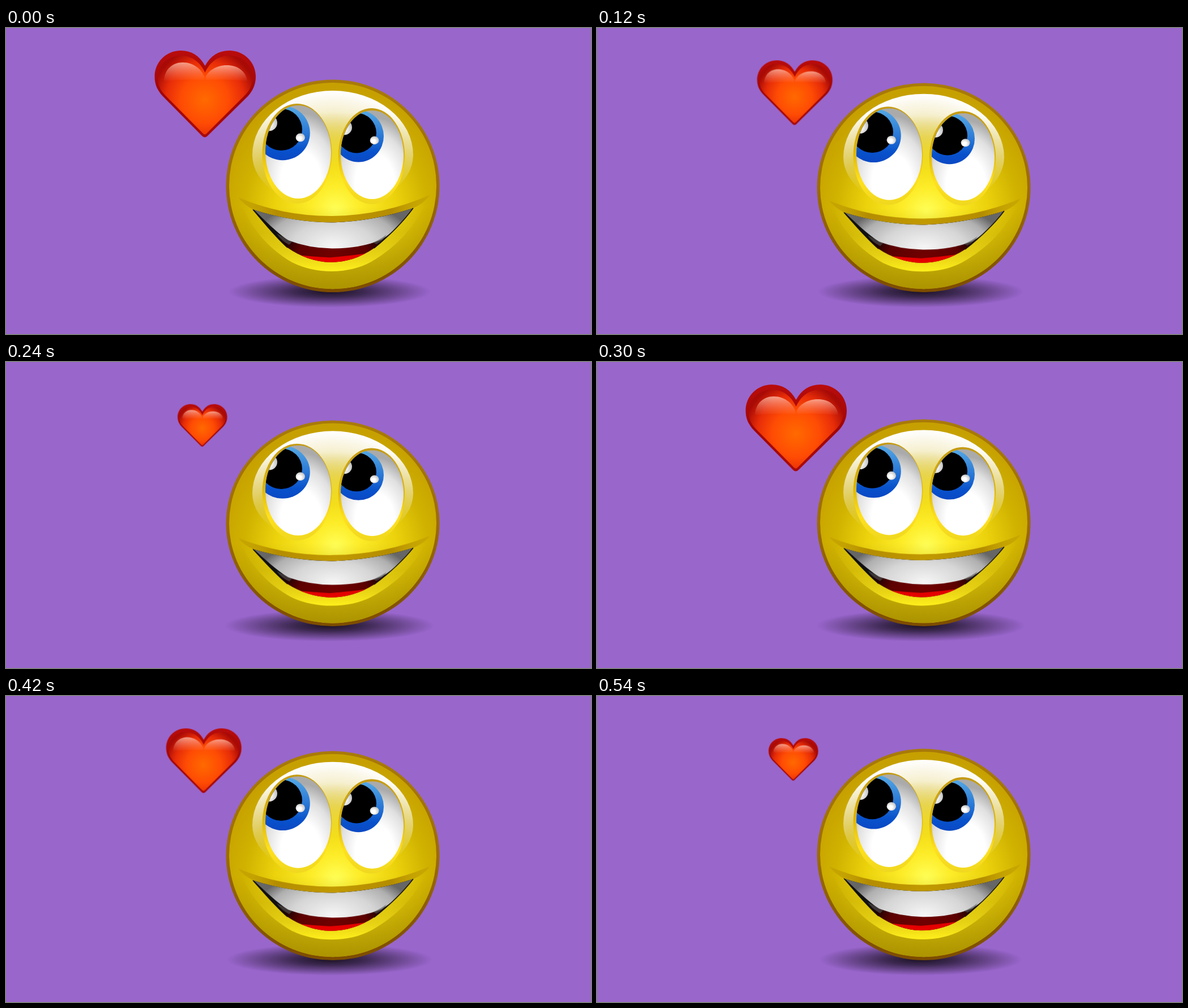
Write an HTML page that moves like this. It is 1033 px wide and 542 px high and loops after 0.6 s.

```html
<!DOCTYPE html>
<html lang="en">
<head>
<meta charset="utf-8">
<title>Smiley with a beating heart</title>
<style>
  html, body { margin: 0; width: 100%; height: 100%; overflow: hidden; background: #9966cc; }
  svg { display: block; width: 100%; height: 100%; }
  .heart, .face, .mouth, .shadow { animation: 600ms steps(5, end) infinite; }
  .heart { transform-origin: 342px 108px; animation-name: shrink; animation-duration: 300ms; }
  .face { transform-origin: 577px 468px; animation-name: squash; }
  .mouth { transform-origin: 577px 439px; animation-name: grin; }
  .shadow { transform-origin: 571.5px 467px; animation-name: spread; }

  @keyframes shrink { from { transform: scale(1); } to { transform: scale(.363); } }
  /* sinks in five steps, then rises back more slowly */
  @keyframes squash {
    0%, 100% { transform: scaleY(1); }
    49.99% { transform: scaleY(.9602); }
    50% { transform: scaleY(.9735); }
  }
  @keyframes grin {
    0%, 100% { transform: scaleY(1); }
    49.99% { transform: scaleY(.894); }
    50% { transform: scaleY(.929); }
  }
  @keyframes spread {
    0%, 100% { transform: scaleX(1); }
    49.99% { transform: scaleX(1.05); }
    50% { transform: scaleX(1.033); }
  }
</style>
</head>
<body>
<svg viewBox="0 0 1033 542" preserveAspectRatio="none">
  <defs>
    <radialGradient id="shade">
      <stop offset="0" stop-opacity=".82"/>
      <stop offset=".35" stop-opacity=".6"/>
      <stop offset=".7" stop-opacity=".28"/>
      <stop offset="1" stop-opacity="0"/>
    </radialGradient>
    <linearGradient id="rim" x2="0" y2="1">
      <stop offset="0" stop-color="#a97a08"/>
      <stop offset=".5" stop-color="#9c6c04"/>
      <stop offset="1" stop-color="#7d4c00"/>
    </linearGradient>
    <radialGradient id="skin" gradientUnits="userSpaceOnUse" cx="582" cy="322" r="215">
      <stop offset="0" stop-color="#ffff58"/>
      <stop offset=".2" stop-color="#fdec28"/>
      <stop offset=".5" stop-color="#ebd20c"/>
      <stop offset=".75" stop-color="#d0b200"/>
      <stop offset="1" stop-color="#c6a000"/>
    </radialGradient>
    <linearGradient id="under" x2="0" y2="1">
      <stop offset=".6" stop-color="#a48c00" stop-opacity="0"/>
      <stop offset="1" stop-color="#a48c00" stop-opacity=".85"/>
    </linearGradient>
    <radialGradient id="shine" gradientUnits="userSpaceOnUse" cx="0" cy="0" r="1" gradientTransform="translate(577 310) scale(190 199)">
      <stop offset=".3" stop-color="#fff" stop-opacity="0"/>
      <stop offset=".6" stop-color="#fff" stop-opacity=".4"/>
      <stop offset=".82" stop-color="#fff" stop-opacity=".82"/>
      <stop offset="1" stop-color="#fff"/>
    </radialGradient>
    <linearGradient id="fade" gradientUnits="userSpaceOnUse" x1="0" y1="150" x2="0" y2="305">
      <stop offset="0" stop-color="#fff"/>
      <stop offset="1" stop-color="#000"/>
    </linearGradient>
    <mask id="fadeOut" maskUnits="userSpaceOnUse" x="430" y="100" width="300" height="230">
      <rect x="430" y="100" width="300" height="230" fill="url(#fade)"/>
    </mask>
    <linearGradient id="socket" x2="0" y2="1">
      <stop offset="0" stop-color="#c59a10"/>
      <stop offset=".45" stop-color="#dcb408"/>
      <stop offset=".75" stop-color="#ffe01c"/>
      <stop offset="1" stop-color="#f0d820"/>
    </linearGradient>
    <radialGradient id="white" cx=".54" cy=".8" r=".72">
      <stop offset=".42" stop-color="#fff"/>
      <stop offset=".75" stop-color="#e0e0e0"/>
      <stop offset="1" stop-color="#aaa"/>
    </radialGradient>
    <linearGradient id="iris" x2="0" y2="1">
      <stop offset="0" stop-color="#55a9e4"/>
      <stop offset=".5" stop-color="#2a78d6"/>
      <stop offset=".8" stop-color="#0852cc"/>
      <stop offset="1" stop-color="#0a48c4"/>
    </linearGradient>
    <radialGradient id="glint" cx=".4" cy=".6" r=".65">
      <stop offset=".3" stop-color="#fff"/>
      <stop offset="1" stop-color="#bbb"/>
    </radialGradient>
    <linearGradient id="crease">
      <stop offset="0" stop-color="#b89400" stop-opacity=".35"/>
      <stop offset=".2" stop-color="#b48c00"/>
      <stop offset=".5" stop-color="#c29a00"/>
      <stop offset=".8" stop-color="#b48c00"/>
      <stop offset="1" stop-color="#b89400" stop-opacity=".35"/>
    </linearGradient>
    <linearGradient id="chin" gradientUnits="userSpaceOnUse" x1="0" y1="305" x2="0" y2="431">
      <stop offset="0" stop-color="#ffec20" stop-opacity="0"/>
      <stop offset=".45" stop-color="#ffec20" stop-opacity=".16"/>
      <stop offset=".75" stop-color="#ffec20" stop-opacity=".55"/>
      <stop offset="1" stop-color="#fff01c"/>
    </linearGradient>
    <radialGradient id="teeth" gradientUnits="userSpaceOnUse" cx="0" cy="0" r="1" gradientTransform="translate(578 386) scale(145 82)">
      <stop offset="0" stop-color="#f6f6f6"/>
      <stop offset=".5" stop-color="#d6d6d6"/>
      <stop offset=".8" stop-color="#b0b0b0"/>
      <stop offset="1" stop-color="#666"/>
    </radialGradient>
    <radialGradient id="throat" gradientUnits="userSpaceOnUse" cx="0" cy="0" r="1" gradientTransform="translate(577 402) scale(110 70)">
      <stop offset="0" stop-color="#720000"/>
      <stop offset=".55" stop-color="#5c0000"/>
      <stop offset=".8" stop-color="#200202"/>
      <stop offset="1" stop-color="#101010"/>
    </radialGradient>
    <linearGradient id="edge" x2="0" y2="1">
      <stop offset="0" stop-color="#b90c0c"/>
      <stop offset=".5" stop-color="#a00606"/>
      <stop offset="1" stop-color="#aa0a0a"/>
    </linearGradient>
    <radialGradient id="ember" gradientUnits="userSpaceOnUse" cx="351" cy="127" r="92">
      <stop offset="0" stop-color="#ff6a00"/>
      <stop offset=".45" stop-color="#ff4c04"/>
      <stop offset=".75" stop-color="#e62c08"/>
      <stop offset="1" stop-color="#a80a06"/>
    </radialGradient>
    <linearGradient id="gloss" x2="0" y2="1">
      <stop offset="0" stop-color="#ffc8b4" stop-opacity=".75"/>
      <stop offset=".5" stop-color="#ffa890" stop-opacity=".42"/>
      <stop offset="1" stop-color="#ff9070" stop-opacity=".03"/>
    </linearGradient>
    <clipPath id="eyeL"><ellipse cx="516" cy="219.5" rx="58" ry="82.5"/></clipPath>
    <clipPath id="eyeR"><ellipse cx="646.5" cy="224.5" rx="55.5" ry="78.5"/></clipPath>
    <clipPath id="lips"><path id="lip" d="M436 321.5Q505 344 577 344.5Q650 342 719 319C698 348 674 370 650 390C625 407 600 415 572 415C545 414 520 405 497 389C474 368 456 345 436 321.5Z"/></clipPath>
  </defs>

  <rect width="1033" height="542" fill="#9966cc"/>

  <ellipse class="shadow" cx="571.5" cy="467" rx="178" ry="28" fill="url(#shade)"/>

  <g class="face">
    <ellipse cx="577" cy="279.8" rx="188.5" ry="188.3" fill="url(#rim)"/>
    <ellipse cx="577" cy="279.5" rx="183" ry="182.7" fill="url(#skin)"/>
    <ellipse cx="577" cy="279.5" rx="183" ry="182.7" fill="url(#under)"/>
    <path d="M435 225A142 114 0 0 1 719 225A142 95 0 0 1 435 225Z" fill="url(#shine)" mask="url(#fadeOut)"/>

    <ellipse cx="514" cy="222.5" rx="61.5" ry="88.5" fill="url(#socket)"/>
    <g clip-path="url(#eyeL)">
      <rect x="458" y="137" width="116" height="166" fill="url(#white)"/>
      <circle cx="488.5" cy="186" r="48.3" fill="url(#iris)"/>
      <circle cx="486" cy="180" r="37" fill="#000"/>
      <circle cx="464.5" cy="168" r="14.5" fill="url(#glint)"/>
      <ellipse cx="519.8" cy="194" rx="8.2" ry="7.6" fill="url(#glint)"/>
    </g>

    <ellipse cx="645.5" cy="227" rx="58.8" ry="85" fill="url(#socket)"/>
    <g clip-path="url(#eyeR)">
      <rect x="590" y="146" width="113" height="158" fill="url(#white)"/>
      <ellipse cx="622.5" cy="191.5" rx="44.5" ry="46" fill="url(#iris)"/>
      <ellipse cx="619" cy="186" rx="35" ry="35.5" fill="#000"/>
      <circle cx="597.5" cy="176" r="13.5" fill="url(#glint)"/>
      <ellipse cx="650.6" cy="199" rx="7.9" ry="7.2" fill="url(#glint)"/>
    </g>
  </g>

  <g class="mouth">
    <path d="M410 300C430 352 462 390 505 415C548 437 606 436 645 414C690 388 725 350 748 296Q666 332 577 333Q490 334 410 300Z" fill="url(#chin)"/>
    <path d="M410 300Q490 334 577 333Q666 332 748 296Q738 311 719 319Q650 343 577 344.5Q505 344 436 321.5Q420 313 410 300Z" fill="url(#crease)"/>
    <use href="#lip" fill="url(#throat)"/>
    <g clip-path="url(#lips)">
      <path d="M515 402Q545 405 572 406.5Q604 404 645 398L640 420H510Z" fill="#e40000"/>
      <path d="M437 321Q505 344 577 344.5Q650 342 718 319C703 342 685 361 663 375Q624 391 575 390.5Q535 390 498 376C477 361 457 341 437 321Z" fill="url(#teeth)"/>
      <path d="M478 364Q492 372 505 379L500 384Q486 377 478 364Z" fill="#555" opacity=".6"/>
      <path d="M672 366Q660 375 648 380L654 383Q666 377 672 366Z" fill="#555" opacity=".6"/>
    </g>
    <path d="M436 321.5C456 345 474 368 497 389M719 319C698 348 674 370 650 390" fill="none" stroke="#151005" stroke-width="1.5"/>
  </g>

  <g class="heart">
    <path d="M351.5 67C342 49 327 40 309 40C282 40 262.5 61 262.5 86C262.5 100 267 110 277 121L346 191Q351 196 356 191L427 121C436 111 441 100 441 86C441 61 421 40 394 40C376 40 361 49 351.5 67Z" fill="url(#edge)"/>
    <path d="M351.5 79C343 60 328 49 309 49C285 49 268 67 268 88C268 99 271 108 279 117L348 187Q351 190 354 187L424 117C432 108 435 99 435 88C435 67 418 49 394 49C375 49 360 60 351.5 79Z" fill="url(#ember)"/>
    <path d="M279 94C280 73 294 61 312 61C332 61 346 74 350.5 87L350.5 92Q315 90 279 94Z" fill="url(#gloss)"/>
    <path d="M426 94C424 76 408 66 390 66C371 66 357 76 352.5 87L352.5 92Q388 90 426 94Z" fill="url(#gloss)"/>
  </g>
</svg>
</body>
</html>
```
